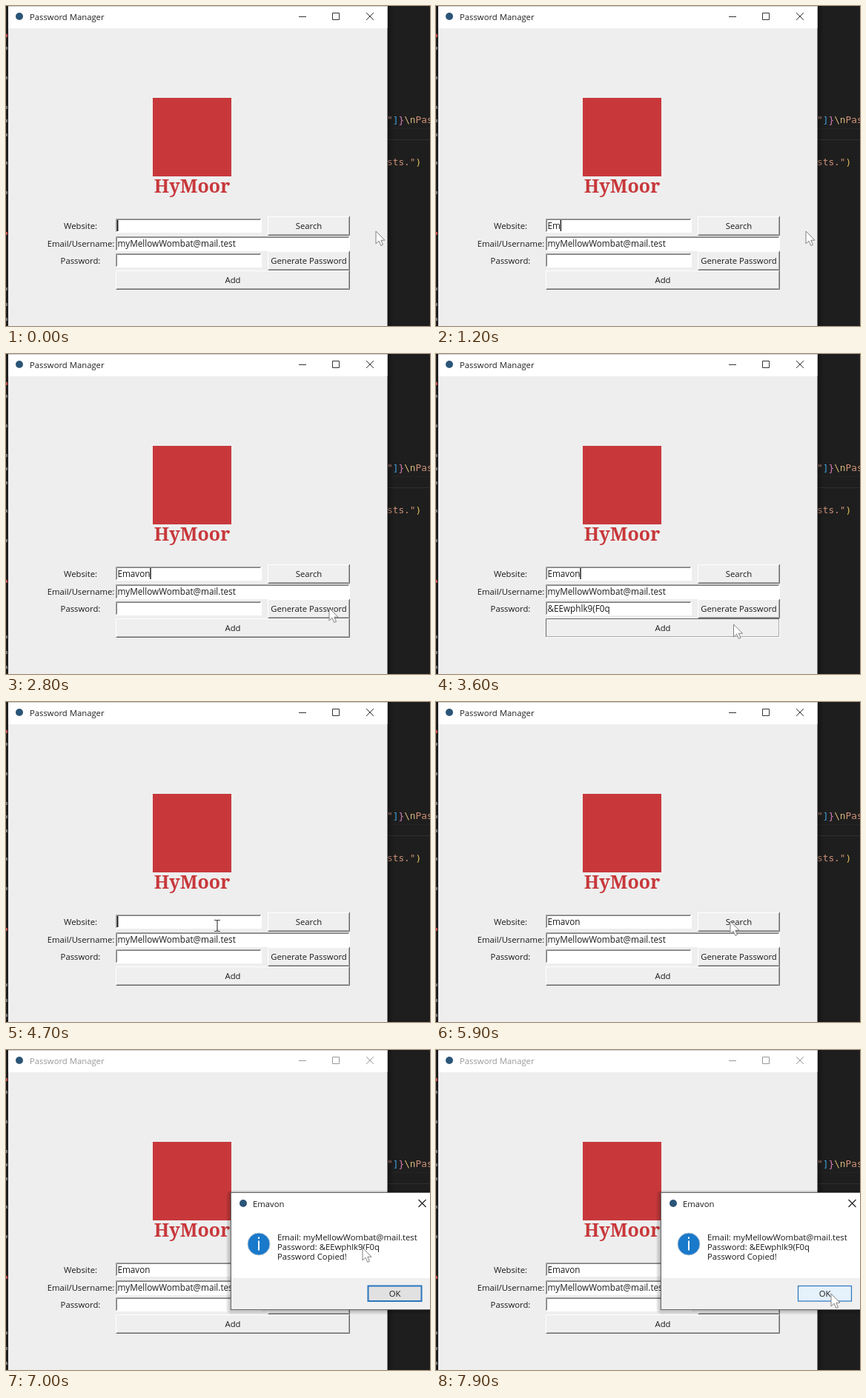
An HTML page for the animation above (8 s loop, 572 by 432 pixels).

```html
<!DOCTYPE html>
<html lang="en">
<head>
<meta charset="utf-8">
<title>Password Manager</title>
<style>
html, body { margin: 0; width: 100%; height: 100%; overflow: hidden; background: #1e1e1e; }
svg { display: block; width: 572px; height: 432px; font: 11.3px "Open Sans", "Noto Sans", sans-serif; fill: #1a1a1a; }
.entry { font-size: 11.7px; }
.code { font: 12.8px "DejaVu Sans Mono", monospace; }
.mid { text-anchor: middle; }
</style>
</head>
<body>
<svg id="stage" viewBox="0 0 572 432" xmlns="http://www.w3.org/2000/svg"></svg>
<script>
const LOOP = 8000, STEP = 100;
const NAME = "Emavon", EMAIL = "myMellowWombat@mail.test", SECRET = "&EEwphlk9(F0q";
const stage = document.getElementById("stage");

function add(tag, attrs, parent = stage, text) {
  const el = document.createElementNS("http://www.w3.org/2000/svg", tag);
  for (const k in attrs) el.setAttribute(k, attrs[k]);
  if (text !== undefined) el.textContent = text;
  parent.appendChild(el);
  return el;
}
const rect = (x, y, width, height, fill, parent) => add("rect", { x, y, width, height, fill }, parent);
const line = (d, stroke, parent, w = 1) => add("path", { d, stroke, fill: "none", "stroke-width": w }, parent);
const label = (x, y, text, cls = "", parent = stage) => add("text", { x, y, class: cls }, parent, text);
const show = (el, on) => el.setAttribute("visibility", on ? "visible" : "hidden");

// Top-left and bottom-right edges of a 3D border
const bevel = (x, y, w, h) => [
  `M${x + .5} ${y + h - 1}V${y + .5}H${x + w - 1}`,
  `M${x + .5} ${y + h - .5}H${x + w - .5}V${y}`
];

function entry(x, y, w, h, text = "") {
  rect(x, y, w, h, "#fff");
  line(bevel(x, y, w, h)[0], "#a0a0a0");
  line(bevel(x + 1, y + 1, w - 2, h - 2)[0], "#808080");
  return label(x + 2.5, y + 14, text, "entry");
}

function button(x, y, w, h, text) {
  rect(x, y, w, h, "#efefef");
  const [tl, br] = bevel(x, y, w, h);
  line(bevel(x + 1, y + 1, w - 2, h - 2)[1], "#a8a8a8");
  const a = line(tl, "#fff"), b = line(br, "#696969");
  label(x + w / 2, y + h / 2 + 4, text, "mid");
  return down => {
    a.setAttribute("stroke", down ? "#696969" : "#fff");
    b.setAttribute("stroke", down ? "#fff" : "#696969");
  };
}

// Editor behind the window
rect(0, 0, 572, 432, "#1e1e1e");
rect(514, 165, 58, 1, "#252525");
rect(514, 180, 58, 1, "#303030");
function code(y, parts) {
  const row = label(514, y, undefined, "code");
  for (const [text, fill] of parts) add("tspan", { fill }, row, text);
}
code(158, [['"', "#ce9178"], ["]", "#3f9fe0"], ["}", "#d57fb5"], ["\\n", "#d7ba7d"], ["Pas", "#ce9178"]]);
code(215, [['sts."', "#ce9178"], [")", "#e0c060"]]);
[38, 55, 95, 135, 153, 172, 210, 250, 305, 380, 401, 421].forEach((y, i) =>
  rect(0, y, 2, 4, i % 8 ? "#777" : "#c04a4a"));

// Main window with a soft shadow
for (let i = 1; i < 8; i++)
  add("rect", { x: 515, y: 0, width: i, height: 432, fill: "#000", opacity: .05 });
rect(3, 0, 511.5, 432, "#eee");
rect(3, 0, 511.5, 30, "#fff");
rect(3, 0, 511.5, 1, "#ccc");
add("circle", { cx: 18, cy: 14, r: 5, fill: "#2b5578" });
const chrome = add("g", {});
label(32, 19, "Password Manager", "", chrome);
const controls = line("M395 14.5H405M440.5 9.5h9v9h-9zM486 9l10 10M496 9l-10 10", "#333", chrome);

rect(198, 124, 106, 106, "#c8383b");
add("text", { x: 251, y: 252, class: "mid", fill: "#c8383b", style: 'font: bold 25px "Noto Serif", serif' }, stage, "HyMoor");

label(100.5, 301, "Website:", "mid");
label(101, 325, "Email/Username:", "mid");
label(100.5, 348, "Password:", "mid");
const site = entry(148, 287, 197, 19);
entry(148, 311, 316, 20, EMAIL);
const secret = entry(148, 334, 197, 19);
const press = {
  search: button(353, 284, 111, 26, "Search"),
  generate: button(353, 331, 111, 26, "Generate Password"),
  save: button(148, 357, 316, 26, "Add")
};
const caret = rect(150, 289, 1.4, 15, "#111");

// Message box
const box = add("g", {});
for (let i = 7; i > 0; i--)
  add("rect", { x: 304 - i, y: 193 - i / 2, width: 280, height: 157 + 1.5 * i, rx: i, fill: "#000", opacity: .045 }, box);
add("rect", { x: 303.5, y: 192.5, width: 272, height: 158, fill: "#fff", stroke: "#666" }, box);
rect(304, 308, 268, 42, "#f0f0f0", box);
add("circle", { cx: 320, cy: 207, r: 5, fill: "#2b5578" }, box);
label(333, 212, NAME, "", box);
line("M556.5 202l10 10M566.5 202l-10 10", "#222", box, 1.2);
add("circle", { cx: 341, cy: 262, r: 15, fill: "#1979ca", stroke: "#b4c4d2" }, box);
rect(340, 257.5, 2, 13, "#fff", box);
rect(340, 252.5, 2, 2.4, "#fff", box);
["Email: " + EMAIL, "Password: " + SECRET, "Password Copied!"].forEach((s, i) =>
  label(366, 257 + 13 * i, s, "", box));
const ok = add("rect", { x: 488.5, y: 318.5, width: 72, height: 20.5, stroke: "#2a76bf" }, box);
label(524.5, 333, "OK", "mid", box);

// Pointers
const arrow = add("path", {
  d: "M0 0V17L4 13.2 6.8 19.4 9.5 18.2 6.8 12.2H12Z", fill: "#fff", stroke: "#808080", "stroke-width": 1
});
const beam = line("M-4 -7.5H-1L0 -6.5 1 -7.5H4M0 -6.5V6.5M-4 7.5H-1L0 6.5 1 7.5H4", "#444", stage, 1.2);

// Time, x, y
const route = [
  [0, 499, 304], [2400, 499, 304], [2800, 436, 343], [3100, 436, 343], [3400, 405, 363],
  [3800, 398, 367], [4200, 375, 353], [4500, 300, 310], [4700, 285, 302], [5500, 285, 302],
  [5900, 397, 296], [6500, 397, 296], [7000, 481, 267], [7100, 484, 271], [7500, 533, 329], [LOOP, 533, 329]
];
function pointer(t) {
  const i = route.findIndex(p => p[0] > t);
  const [t0, x0, y0] = route[i - 1], [t1, x1, y1] = route[i];
  const k = (t - t0) / (t1 - t0), e = k * k * (3 - 2 * k);
  return [x0 + (x1 - x0) * e, y0 + (y1 - y0) * e];
}

const CLEAR = 3700, OPEN = 6100;
const keys = [[300, 700, 1300, 1600, 1900, 2200], [4900, 5000, 5200, 5300, 5400, 5600]];
const within = (t, from, len) => t >= from && t < from + len;

function draw(t) {
  const typed = keys[t < CLEAR ? 0 : 1].filter(k => k <= t).length;
  site.textContent = NAME.slice(0, typed);
  secret.textContent = within(t, 3000, CLEAR - 3000) ? SECRET : "";
  press.generate(within(t, 2900, 100));
  press.save(within(t, 3600, 100));
  press.search(within(t, 6000, 100));

  const open = t >= OPEN;
  const blink = t >= 900 && (t + 100) % 1000 < 200;
  show(caret, !open && !blink);
  caret.setAttribute("x", typed ? 150.3 + site.getComputedTextLength() : 150);

  chrome.setAttribute("fill", open ? "#999" : "#222");
  controls.setAttribute("stroke", open ? "#999" : "#333");
  const grow = Math.min(1, (t - OPEN + 80) / 210);
  show(box, open);
  if (open) {
    const s = .94 + .06 * grow;
    box.setAttribute("opacity", grow);
    box.setAttribute("transform", `translate(440 271) scale(${s}) translate(-440 -271)`);
  }

  const [x, y] = pointer(t);
  const onOk = open && x > 488 && y > 318;
  ok.setAttribute("fill", onOk ? "#e5f1fb" : "#e1e1e1");
  ok.setAttribute("stroke-width", onOk ? 1.2 : 2);
  const inEntry = !open && x > 148 && x < 345 && y > 287 && y < 353;
  show(arrow, !inEntry);
  show(beam, inEntry);
  for (const p of [arrow, beam]) p.setAttribute("transform", `translate(${x} ${y})`);
}

const start = performance.now();
function tick() {
  const t = (performance.now() - start) % LOOP;
  draw(Math.floor(t / STEP) * STEP);
  requestAnimationFrame(tick);
}
draw(0);
requestAnimationFrame(tick);
</script>
</body>
</html>
```
